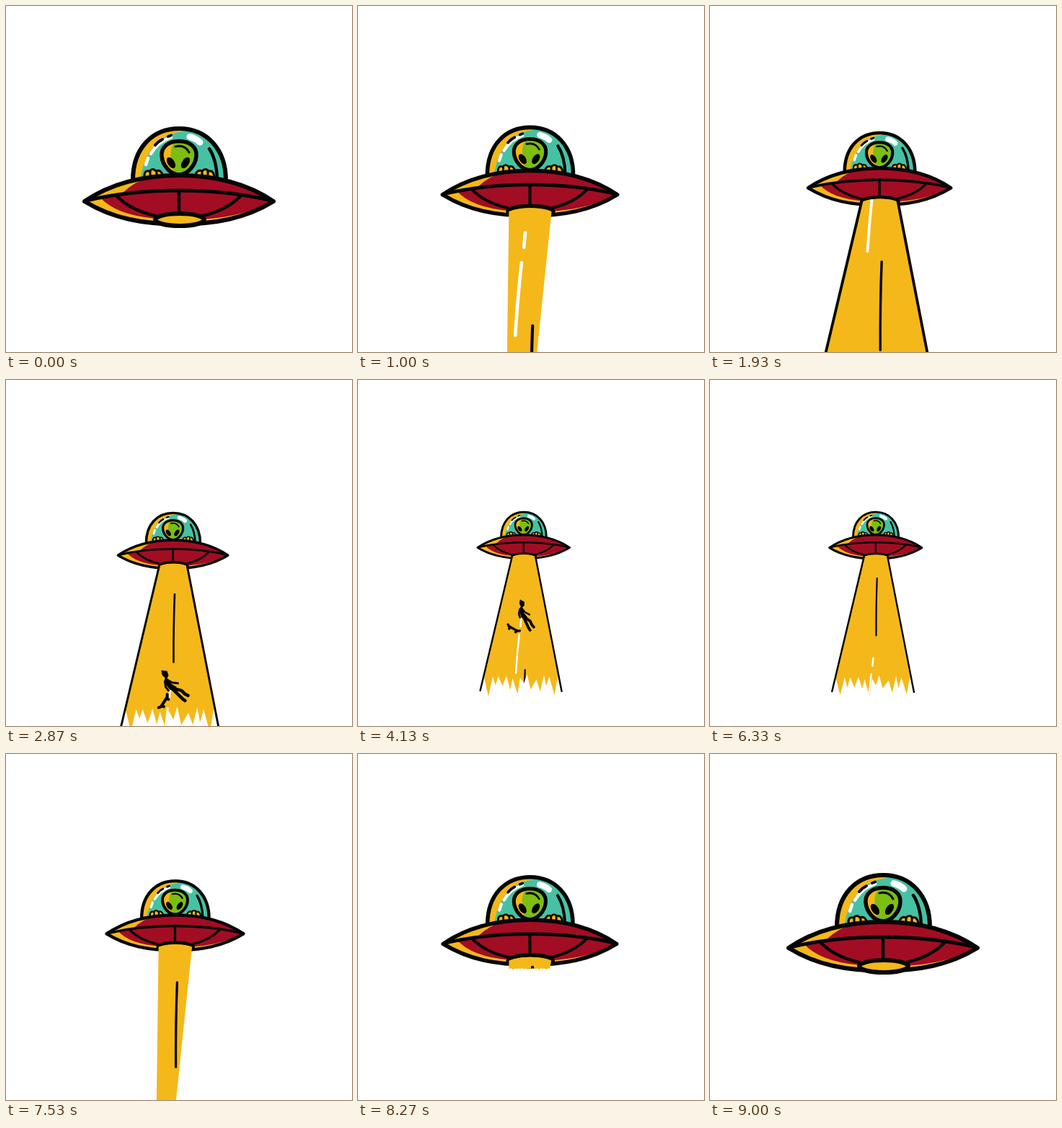
An HTML page that plays this animation: 480x480 px, repeating every 9.07 s.

```html
<!DOCTYPE html>
<html lang="en">
<head>
<meta charset="utf-8">
<title>Saucer</title>
<style>
  html, body { margin: 0; width: 100%; height: 100%; overflow: hidden; background: #fff; }
  svg { display: block; width: 100%; height: 100%; }
  .ln { fill: none; stroke: #050505; stroke-linecap: round; stroke-linejoin: round; }
  .wh { fill: none; stroke: #fff; stroke-linecap: round; }
  .ye { fill: #f5b81a; }
</style>
</head>
<body>
<svg viewBox="0 0 480 480">
  <defs>
    <clipPath id="beamClip"><path id="beamMask"/></clipPath>
    <clipPath id="riderClip"><path id="riderMask"/></clipPath>
    <clipPath id="domeClip"><path id="domeShape" d="M176 242C176 197 203 170 240.500 170C278 170 305 198 305 242Z"/></clipPath>
    <clipPath id="headClip"><path id="headShape" d="M240 187.500C255 187.500 265 196 264 208C263 221 252 234 240 234C228 234 217 221 216 208C215 196 225 187.500 240 187.500Z"/></clipPath>
    <clipPath id="hullClip"><path id="hullShape" d="M109 271C143 248 188 235 240 235C292 235 337 248 371 271C332 295 290 302.500 240 302.500C190 302.500 148 295 109 271Z"/></clipPath>
  </defs>
  <g id="ship">
    <g transform="translate(-239.500 -271)">
      <g clip-path="url(#domeClip)">
        <rect x="170" y="160" width="145" height="85" fill="#47c1a4"/>
        <path class="ye" d="M170 245V160H245V174C212 178 190 204 186 245Z"/>
        <path class="wh" stroke-width="4.500" d="M229 182Q210 189 201 205M197 211L194 220"/>
        <path class="wh" stroke-width="9" d="M255 181.500Q264 184 269 189"/>
        <path class="ln" stroke-width="4" d="M229 179.500L225 181M217 185Q211 188 207 193"/>
        <path class="ln" stroke-width="4.500" d="M282 198Q292 213 293 240"/>
      </g>
      <g class="ln" stroke-width="3">
        <path class="ye" d="M192 236Q192 227 199 229Q204 224 208 229Q215 226 218 236M262 236Q265 226 272 229Q277 224 281 229Q287 227 289 236"/>
        <path d="M200 229V236M209 229V236M272 229V236M280 229V236"/>
      </g>
      <g clip-path="url(#headClip)">
        <rect x="212" y="184" width="56" height="54" fill="#7cbe12"/>
        <path class="ye" d="M212 184H238C226 194 226 212 234 238H212Z"/>
      </g>
      <use href="#headShape" class="ln" stroke-width="5.500"/>
      <path class="ln" stroke-width="3" d="M235 195Q248 192 254 203"/>
      <ellipse cx="229" cy="217.500" rx="4.800" ry="8.500" transform="rotate(-33 229 217.500)"/>
      <ellipse cx="249" cy="217.500" rx="4.800" ry="8.500" transform="rotate(33 249 217.500)"/>
      <use href="#domeShape" class="ln" stroke-width="6"/>

      <g clip-path="url(#hullClip)">
        <rect x="100" y="230" width="280" height="80" fill="#a20d23"/>
        <path class="ye" d="M105 271C140 248 178 235 210 233Q178 243 162 259Q135 263 108 272Z"/>
        <path class="ye" d="M109 270L130 265Q152 290 208 295V306Q150 300 109 270ZM371 270L355 278Q320 293 272 296V306Q335 300 371 270Z"/>
      </g>
      <g class="ln">
        <path stroke-width="5" d="M111 270Q170 256 240 256Q310 256 369 270"/>
        <path stroke-width="4.500" d="M153 263Q172 283 207 291M240 257V288M326 263Q307 283 273 291"/>
        <use href="#hullShape" stroke-width="6"/>
      </g>
      <ellipse class="ye" cx="241" cy="296.500" rx="34" ry="8.500" stroke="#050505" stroke-width="6"/>
    </g>
    <g id="ray">
      <path id="beam" class="ye"/>
      <g clip-path="url(#beamClip)">
        <path id="light" class="wh" stroke-width="5" d="M-6.500 2L-8.500 24M-12 47Q-18 100 -21.500 156"/>
        <path id="dark" class="ln" stroke-width="4.500" d="M4.500 2Q1.500 80 2 164"/>
      </g>
      <path id="sideL" class="ln" stroke-width="5" pathLength="1"/>
      <path id="sideR" class="ln" stroke-width="5" pathLength="1"/>
      <g clip-path="url(#riderClip)">
        <g id="rider">
          <path d="M-17 -22L-9 -21L-7 -15L-9 -11L-3 -3L4 1L2 7L-5 5L-13 -5L-12 -12Q-17 -14 -17 -22Z"/>
          <path class="ln" stroke-width="3" d="M-9 -9L-2 -5L6 -4M-12 -7L-11 1L-7 6"/>
          <path class="ln" stroke-width="4.500" d="M0 3L11 6L16 11L20 13M-1 4L8 13L13 18L16 20"/>
        </g>
        <g id="board">
          <path class="ln" stroke-width="4" d="M-11 -1L-8 1H8L11 -1"/>
          <circle cx="-6" cy="4" r="2.200"/><circle cx="6" cy="4" r="2.200"/>
        </g>
      </g>
    </g>
  </g>
</svg>
<script>
const LOOP = 9070, STEP = LOOP / 136, CYCLE = 15, TEETH = 11;
const $ = id => document.getElementById(id);
const set = (id, name, value) => $(id).setAttribute(name, value);
const show = (id, on) => { $(id).style.display = on ? "" : "none"; };
const mix = (a, b, k) => a + (b - a) * k;
const part = (t, a, b) => Math.min(1, Math.max(0, (t - a) / (b - a)));
const ease = (t, a, b) => (1 - Math.cos(Math.PI * part(t, a, b))) / 2;
const noise = n => Math.abs(Math.sin(n * 127.1 + 3) * 43758.5) % 1;

// The saucer drifts away, hovers, then comes back.
function drawShip(t) {
  const far = ease(t, 0, 4) - ease(t, 6.2, 9);
  const bob = -3.6 * Math.sin(2 * Math.PI * part(t, 0, 4)) - 2 * part(t, 6.2, 9);
  const x = 239.5 - 10 * far, y = 271 - 38.5 * far + bob;
  set("ship", "transform", `translate(${x} ${y}) scale(${1 - .513 * far})`);
}

// Ragged lower edge: alternating notches and tips across the width.
function raggedEdge(left, right, end, len, frame) {
  let d = "";
  for (let i = 0; i <= 2 * TEETH; i++) {
    const tip = i % 2 === 0;
    const u = .01 + .98 * (i + .7 * (noise(i) - .5)) / (2 * TEETH);
    const depth = tip ? mix(-18, 16, noise(i + 40)) + 4 * Math.sin(frame * .9 + i) : mix(-48, -28, noise(i + 40));
    d += `L${mix(left, right, u)} ${end + depth * len}`;
  }
  return d;
}

function drawBeam(t, frame) {
  const len = ease(t, .2, .8) - ease(t, 7.7, 8.35);
  const open = ease(t, 1, 1.7) - ease(t, 6.5, 7.5);
  const trim = ease(t, 1.2, 1.8) - ease(t, 6.5, 7.3);
  const left = mix(-31, mix(-36, -123, open), len);
  const right = mix(33, mix(-5, 109, open), len);
  const end = mix(24, 407, len);
  const mouth = "M33 25Q1 15 -31 25";
  const shape = `${mouth}${raggedEdge(left, right, end, len, frame)}Z`;

  show("ray", len > .01);
  set("beam", "d", shape);
  set("beamMask", "d", shape);
  set("riderMask", "d", `${mouth}L${mix(-31, left, 1.5)} 600L${mix(33, right, 1.5)} 600Z`);
  set("sideL", "d", `M-32 24L${left} ${end}`);
  set("sideR", "d", `M34 24L${right} ${end + 2}`);
  for (const id of ["sideL", "sideR"]) {
    set(id, "stroke-dasharray", `${trim} 2`);
    show(id, trim > .01);
  }
}

// Streaks rush down, brake and rest; the dark one then speeds off.
function drawStreaks(frame) {
  const a = (frame + 1) % CYCLE, b = (frame + 12) % CYCLE;
  const light = 318 - 358 * (1 - part(a, 0, 7)) ** 2;
  const dark = 91 - 160 * (1 - part(b, 0, 2.5)) ** 2 + 255 * part(b, 10, 14) ** 1.3;
  set("light", "transform", `translate(0 ${light})`);
  set("dark", "transform", `translate(0 ${dark})`);
}

function drawRider(t) {
  const k = (t - 2.87) / 1.26, y = mix(312, 194, k);
  const place = (id, x, y, turn) => {
    set(id, "transform", `translate(${x} ${y}) rotate(${turn}) scale(1.72)`);
    show(id, t > 1.5 && t < 6.2);
  };
  place("rider", mix(2, 5, k), y, 20 * k);
  place("board", mix(-22, -28, k), y + 36, mix(-57, 28, k));
}

function draw(ms) {
  const frame = Math.floor((ms + 10) / STEP) % 136;
  const t = frame * STEP / 1000;
  drawShip(t);
  drawBeam(t, frame);
  drawStreaks(frame);
  drawRider(t);
}

const start = performance.now();
function tick() {
  draw(performance.now() - start);
  requestAnimationFrame(tick);
}
tick();
</script>
</body>
</html>
```
